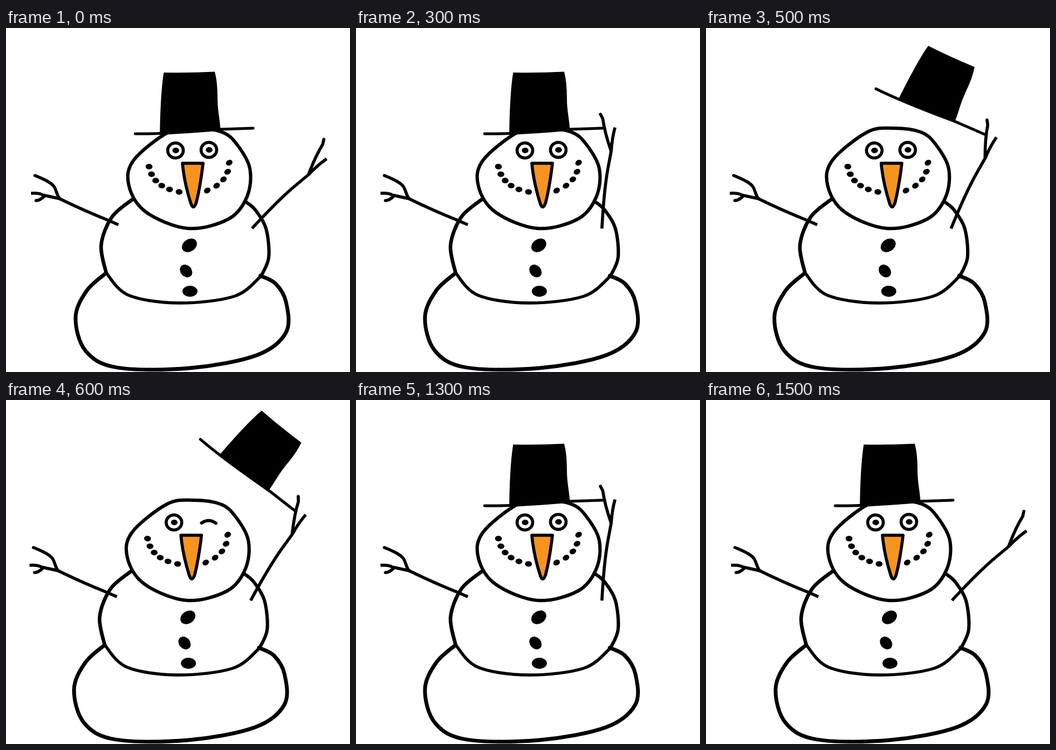
Write an HTML page that moves like this. It is 618x618 px and loops after 1700 ms.

```html
<!DOCTYPE html>
<html lang="en">
<head>
<meta charset="utf-8">
<title>Snowman tipping his hat</title>
<style>
  html, body { margin: 0; width: 100%; height: 100%; overflow: hidden; background: #fff; }
  svg { display: block; width: 100vw; height: 100vh; }
  .ink { fill: none; stroke: #000; stroke-width: 5.5; stroke-linecap: round; stroke-linejoin: round; }
  .flat { stroke-linecap: butt; }
</style>
</head>
<body>
<svg viewBox="0 0 618 618">
  <g id="man">
    <g id="balls"></g>
    <g id="face">
      <path class="ink" style="fill:#f7941e" d="M317 243H354Q349 285 342 313Q337 329 332 315Q320 277 317 243Z"/>
      <g id="leftEye"></g>
      <g id="rightEye"></g>
      <path id="wink" class="ink" d="M354 221Q367 212 380 221.500"/>
    </g>
    <g class="ink">
      <path class="flat" d="M202 353.500L185 346Q140 328 97 307"/>
      <path d="M97 307C92 303 91 293 87 286S72 273 52 265"/>
      <path class="flat" d="M98 307L66 300Q60 296 45 297"/>
      <path d="M69 302Q61 310 54 310"/>
    </g>
    <g id="arm" class="ink">
      <path class="flat" d="M442 360Q490 308 520 283L544 263Q560 246 576 235"/>
      <path d="M544 262Q556 230 569 209L571 200"/>
    </g>
    <g id="hat">
      <path d="M283.500 80Q329 81 375 78.500Q380 96 380 126C380 148 384 162 385.500 184L276.500 190C277 150 279 106 283.500 80Z"/>
      <path class="ink" style="stroke-width:5" d="M232 190Q280 191 385 182L444 180"/>
    </g>
  </g>
</svg>
<script>
const $ = id => document.getElementById(id);

function add(parent, tag, attrs) {
  const el = document.createElementNS('http://www.w3.org/2000/svg', tag);
  for (const key in attrs) el.setAttribute(key, attrs[key]);
  return $(parent).appendChild(el);
}

// Smooth curve through "x,y x,y ..." points
function spline(text, closed) {
  const pts = text.split(' ').map(p => p.split(',').map(Number));
  const n = pts.length;
  const at = i => closed ? pts[(i + n) % n] : pts[Math.max(0, Math.min(n - 1, i))];
  let d = 'M' + pts[0];
  for (let i = 0; i < (closed ? n : n - 1); i++) {
    const [a, b, c, e] = [at(i - 1), at(i), at(i + 1), at(i + 2)];
    const c1 = b.map((v, k) => v + (c[k] - a[k]) / 6);
    const c2 = c.map((v, k) => v - (e[k] - b[k]) / 6);
    d += `C${c1} ${c2} ${c}`;
  }
  return d;
}

const outline = (text, width, closed) =>
  add('balls', 'path', { class: 'ink', d: spline(text, closed), style: `stroke-width:${width}` });

const dot = (parent, cx, cy, rx, ry, turn = 0) =>
  add(parent, 'ellipse', { cx, cy, rx, ry, transform: `rotate(${turn} ${cx} ${cy})` });

// Head, then the sides and bottom of the middle ball, then the lower ball
outline('292,187 340,180 388,187 414,208 438,252 433,303 400,343 327,360 252,331 221,284 229,238', 6, true);
outline('227,308 190,340 171,390 180,440', 6.5);
outline('180,440 220,480 310,494 410,482 458,446', 5.5);
outline('458,446 472,412 467,360 448,327 432,313', 6);
outline('180,440 145,472 125,520 143,580 200,610 330,611 450,588 503,547 503,492 484,459 457,445', 6.8);

// Buttons
dot('balls', 329.5, 390.5, 14.5, 11, -35);
dot('balls', 323.5, 436.5, 12.5, 10, 50);
dot('balls', 330.5, 473, 13.5, 10);

function eye(parent, x, y) {
  dot(parent, x, y, 14, 13.5).setAttribute('class', 'ink');
  dot(parent, x + 0.5, y, 6, 5);
}
eye('leftEye', 304.5, 220);
eye('rightEye', 364.5, 219);

// Dots spaced evenly along a quadratic curve
function dots(count, a, b, c, turn) {
  for (let i = 0; i < count; i++) {
    const t = i / (count - 1), s = 1 - t;
    const [x, y] = [0, 1].map(k => s * s * a[k] + 2 * s * t * b[k] + t * t * c[k]);
    dot('face', x, y, 6.2, 5, turn);
  }
}
dots(6, [257, 249], [264, 286], [311, 294.5], 5);
dots(5, [401, 242], [400, 277], [361.5, 292], -30);

// Level 0 is rest, 2 has the hand on the brim, 5 has the hat fully raised
function levelAt(t) {
  if (t < 600) return Math.max(0, Math.floor(t / 100) - 1);
  if (t < 1100) return 5;
  if (t < 1300) return 3;
  return Math.max(0, 15 - Math.floor(t / 100));
}

const LOOP = 1700;
const SHOULDER = [443, 359];
const GRIP = { reach: 179, angle: -49 };
const BRIM = [446, 179];

function draw(level) {
  const reach = Math.min(level, 2);
  const lift = Math.max(0, level - 2) / 3;
  const turn = -13.2 * reach * (reach + 1) / 2 + 25.3 * lift ** 0.7;
  $('man').setAttribute('transform', `translate(${-0.55 * level})`);
  $('arm').setAttribute('transform', `rotate(${turn} ${SHOULDER})`);

  // The lifted brim stays in the hand
  const a = (GRIP.angle + turn) * Math.PI / 180;
  const hand = [SHOULDER[0] + GRIP.reach * Math.cos(a), SHOULDER[1] + GRIP.reach * Math.sin(a)];
  const [x, y] = lift ? hand : BRIM;
  $('hat').setAttribute('transform',
    `translate(${x} ${y}) rotate(${39.8 * lift ** 1.1}) translate(${-BRIM[0]} ${-BRIM[1]})`);

  const winking = level === 5;
  $('rightEye').setAttribute('visibility', winking ? 'hidden' : 'visible');
  $('wink').setAttribute('visibility', winking ? 'visible' : 'hidden');
}

const start = performance.now();
function tick() {
  draw(levelAt((performance.now() - start) % LOOP));
  requestAnimationFrame(tick);
}
tick();
</script>
</body>
</html>
```
